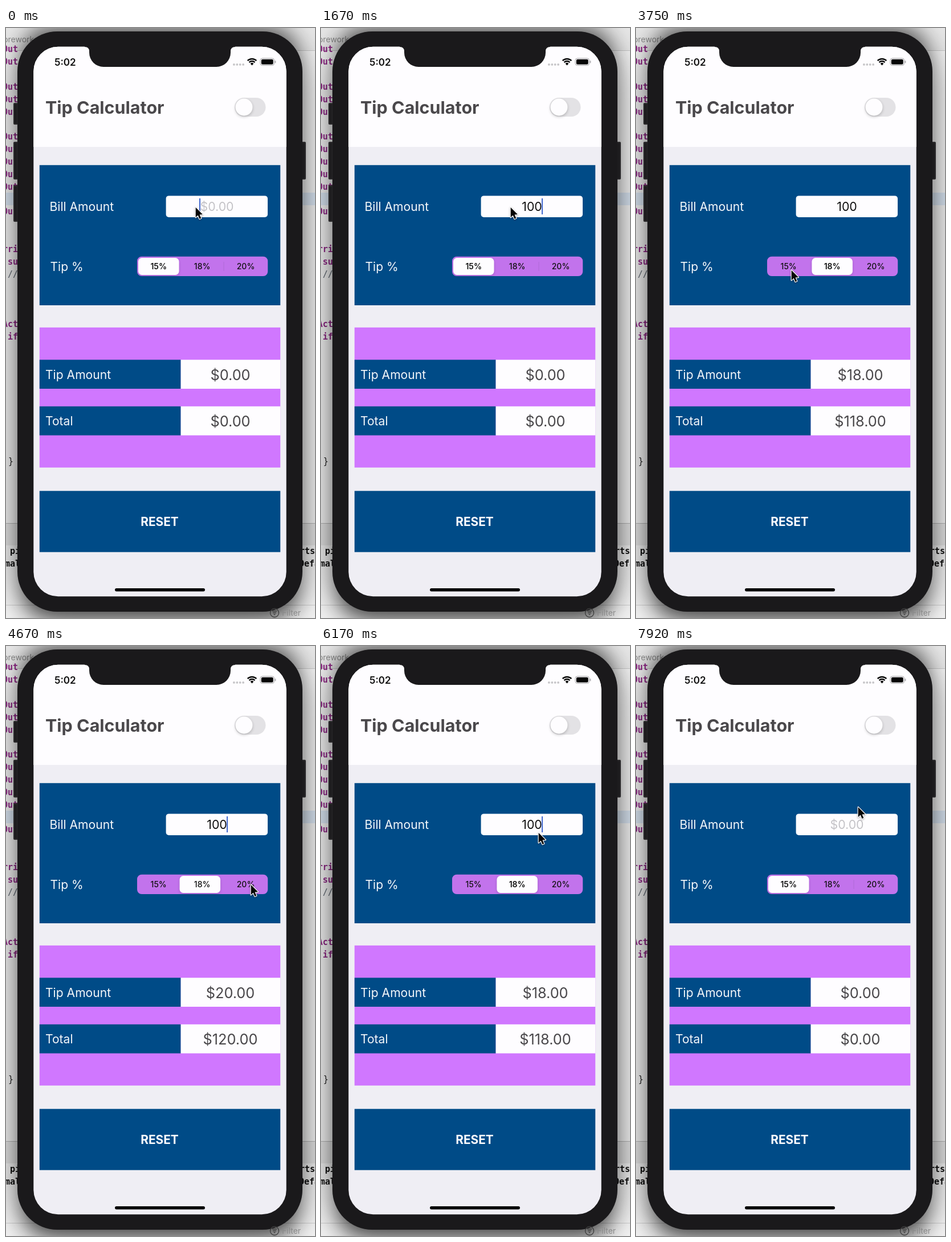
Animation, 542 px wide and 1032 px high, one loop 8000 ms. Source, as an HTML page with a canvas:

```html
<!DOCTYPE html>
<html lang="en">
<head>
<meta charset="utf-8">
<title>Tip Calculator</title>
<style>
html, body { margin: 0; width: 100%; height: 100%; overflow: hidden; background: #ccc; }
canvas { display: block; width: 542px; height: 1032px; }
</style>
</head>
<body>
<canvas id="stage" width="542" height="1032"></canvas>
<script>
const ctx = document.getElementById('stage').getContext('2d');
const LOOP = 8000, STEP = 1000 / 12;
const BLUE = '#004b87', PURPLE = '#d077ff', INK = '#4a484b', CASE = '#1a191b';
const SANS = 'Inter, "Liberation Sans", sans-serif';
const MONO = '"DejaVu Sans Mono", "Liberation Mono", monospace';

// [time, x, y] of the pointer tip
const pointer = [
  [0, 332, 313], [1850, 332, 313], [2580, 347, 416], [3080, 347, 416],
  [3600, 272, 423], [4000, 272, 423], [4420, 429, 417], [4920, 429, 417],
  [5330, 352, 417], [5670, 352, 417], [6120, 381, 326], [6250, 381, 326],
  [6830, 276, 858], [7250, 276, 858], [7920, 389, 281]
];
// [time, segment, slide duration]
const picks = [[0, 0, 0], [3000, 1, 300], [3850, 0, 300], [4500, 2, 345], [5500, 1, 300], [7170, 0, 300]];
const typed = [[0, ''], [580, '1'], [830, '10'], [1000, '100'], [7170, '']];
const rates = [15, 18, 20];

const clamp = v => Math.max(0, Math.min(1, v));
const ease = v => { v = clamp(v); return v * v * (3 - 2 * v); };
const mix = (a, b, k) => a + (b - a) * k;
const latest = (list, t) => list.filter(e => e[0] <= t).pop();

function rect(x, y, w, h, color) {
  ctx.fillStyle = color;
  ctx.fillRect(x, y, w, h);
}

function round(x, y, w, h, r, color) {
  ctx.fillStyle = color;
  ctx.beginPath();
  ctx.roundRect(x, y, w, h, r);
  ctx.fill();
}

function shadow(color, blur, dy, dx = 0) {
  ctx.shadowColor = color;
  ctx.shadowBlur = blur;
  ctx.shadowOffsetX = dx;
  ctx.shadowOffsetY = dy;
}

const noShadow = () => shadow('transparent', 0, 0);

// cy is the middle of the capital letters
function text(str, x, cy, size, color, weight = 400, align = 'left', family = SANS) {
  ctx.font = `${weight} ${size}px ${family}`;
  ctx.textAlign = align;
  ctx.fillStyle = color;
  ctx.fillText(str, x, cy + size * 0.364);
  return ctx.measureText(str).width;
}

function code(str, x, y, color, weight = 700) {
  text(str, x, y, 15, color, weight, 'left', MONO);
}

function drawEditor() {
  rect(0, 0, 542, 1032, '#f6f6f6');
  rect(0, 0, 542, 40, '#e9e9e9');
  rect(0, 39, 542, 1, '#c9c9c9');
  rect(0, 288, 542, 22, '#dce8f5');
  text('prework', -5, 20, 14, '#8b8b8b');
  [37, 59, 103, 125, 147, 190, 212, 234, 256, 278, 321].forEach(y => code('Out', -6, y, '#8f2686'));
  code('rri', -6, 387, '#8f2686');
  code(' su', -6, 409, '#8f2686');
  code(' //', -6, 431, '#5d6670', 400);
  code('Act', -6, 518, '#8f2686');
  code(' if', -6, 540, '#8f2686');
  code(' }', -5, 758, '#222', 400);
  rect(0, 867, 542, 38, '#e6e6e6');
  rect(0, 866, 542, 1, '#b5b5b5');
  code(' pi', -2, 915, '#111');
  code('mal', -2, 937, '#111');
  code('rts', 515, 915, '#111');
  code('Defa', 514, 937, '#111');
  rect(0, 1009, 542, 1, '#d0d0d0');
}

function drawFilter() {
  ctx.strokeStyle = '#3d3d3d';
  ctx.lineWidth = 1.3;
  ctx.beginPath();
  ctx.arc(471, 1023, 7.5, 0, 7);
  [4, 2.8, 1.4].forEach((w, i) => {
    ctx.moveTo(471 - w, 1020 + i * 3);
    ctx.lineTo(471 + w, 1020 + i * 3);
  });
  ctx.stroke();
  text('Filter', 484, 1023, 14, '#8a8a8a');
}

function drawPhone() {
  // only the shadows of these two shapes fall on the stage
  shadow('rgba(0,0,0,.56)', 60, 10, 2000);
  round(-1980, 6, 500, 1015, 70, '#000');
  shadow('rgba(0,0,0,.5)', 34, 0, 2000);
  round(-1966, 0, 472, 1030, 40, '#000');
  noShadow();
  [[13, 131, 38], [13, 199, 66], [13, 275, 64], [518, 199, 66]].forEach(([x, y, h]) => {
    round(x, y, 8, h, 2, '#2b2a2c');
    rect(x + 2, y + 2, 4, h - 4, '#1d1c1e');
  });
  round(20, 6, 500, 1015, 70, CASE);
  drawFilter();
  round(48.3, 32.8, 443.4, 961.5, 43, '#efeef4');
  round(48.3, 32.8, 443.4, 175.2, [43, 43, 0, 0], '#fefdff');
  // notch
  ctx.fillStyle = CASE;
  ctx.beginPath();
  ctx.moveTo(138, 32);
  ctx.lineTo(138, 33);
  ctx.quadraticCurveTo(146, 33, 146, 41);
  ctx.arcTo(146, 68, 172, 68, 25);
  ctx.arcTo(394, 68, 394, 42, 25);
  ctx.lineTo(394, 41);
  ctx.quadraticCurveTo(394, 33, 402, 33);
  ctx.lineTo(402, 32);
  ctx.fill();
  round(191, 980, 158, 5.5, 2.75, '#050505');
}

function drawStatus() {
  text('5:02', 85, 59.5, 17, '#111', 600);
  for (let i = 0; i < 4; i++) round(398 + i * 5.4, 62, 3.8, 3.8, 1.9, '#c6c5c8');
  ctx.strokeStyle = ctx.fillStyle = '#050505';
  ctx.lineWidth = 2.4;
  [11, 7].forEach(r => {
    ctx.beginPath();
    ctx.arc(431.5, 65, r, -Math.PI * 0.75, -Math.PI * 0.25);
    ctx.stroke();
  });
  ctx.beginPath();
  ctx.moveTo(431.5, 65.5);
  ctx.arc(431.5, 65, 4, -Math.PI * 0.75, -Math.PI * 0.25);
  ctx.fill();
  ctx.strokeStyle = '#a5a4a7';
  ctx.lineWidth = 1;
  ctx.beginPath();
  ctx.roundRect(446, 53, 24.5, 12.5, 3.8);
  ctx.stroke();
  round(447.8, 54.8, 20.9, 8.9, 2.2, '#050505');
  round(471.7, 57, 1.6, 4.5, 1, '#a5a4a7');
}

function drawField(value, caretOn) {
  round(280.6, 293.4, 178.4, 37.5, 5, '#fefdff');
  const size = 21.3;
  const w = value
    ? text(value, 370, 312.5, size, '#111', 400, 'center')
    : text('$0.00', 370, 312.5, size, '#c4c3c7', 400, 'center');
  if (caretOn) rect(Math.round(370 + (value ? w : -w) / 2) - 1, 298, 2, 28 - (value ? 0 : 4), '#4167ce');
}

function drawSegments(t) {
  const i = picks.indexOf(latest(picks, t));
  const [start, now, span] = picks[i];
  const before = i ? picks[i - 1][1] : 0;
  const k = span ? ease((t - start) / span) : 1;
  const pos = mix(before, now, k);
  round(230, 399.7, 229.2, 34.3, 8, '#c273ec');
  [306, 382].forEach((x, n) => {
    if (Math.abs(pos - n - 0.5) > 0.9) rect(x - 0.5, 409, 1, 16, '#b06ad8');
  });
  shadow('rgba(0,0,0,.14)', 5, 2);
  round(232 + pos * 76.4, 402, 71.5, 30, 6.5, '#fefdff');
  noShadow();
  rates.forEach((r, n) => {
    const weight = k === 1 && n === now ? 600 : 500;
    text(r + '%', 267.7 + n * 76.4, 417, 14, '#111', weight, 'center');
  });
  return rates[now];
}

function drawRow(label, y, amount) {
  rect(58.8, y, 247.8, 50.7, BLUE);
  rect(306.6, y, 174.6, 50.7, '#fefdff');
  text(label, 69, y + 26, 21.1, '#f4f7fa');
  text('$' + amount.toFixed(2), 393.5, y + 26, 25.3, INK, 400, 'center');
}

function drawApp(t) {
  text('Tip Calculator', 69, 139, 30.5, INK, 700);
  round(401, 122, 54.5, 33, 16.5, '#e3e2e5');
  shadow('rgba(0,0,0,.22)', 5, 2);
  round(402.5, 123.5, 30, 30, 15, '#fefdff');
  noShadow();

  rect(58.8, 239.8, 422.4, 245.2, BLUE);
  text('Bill Amount', 76.5, 312.5, 21.1, '#f4f7fa');
  text('Tip %', 77.5, 417, 21.1, '#f4f7fa');
  const value = latest(typed, t)[1];
  const blink = (t % 1000) / 1000;
  drawField(value, t < 1400 || (blink >= 0.15 && blink < 0.7));
  const rate = drawSegments(t);

  // results follow a choice of rate, not the typing
  const bill = t >= 3000 && t < 7170 ? 100 : 0;
  const tip = bill * rate / 100;
  rect(58.8, 523.8, 422.4, 245, PURPLE);
  drawRow('Tip Amount', 580.3, tip);
  drawRow('Total', 661.8, bill + tip);

  rect(58.8, 809.7, 422.4, 107, BLUE);
  text('RESET', 269.5, 863.5, 20.8, '#fefdff', 700, 'center');
}

function drawPointer(t) {
  let n = 0;
  while (n < pointer.length - 2 && pointer[n + 1][0] <= t) n++;
  const [t0, x0, y0] = pointer[n], [t1, x1, y1] = pointer[n + 1];
  const k = ease((t - t0) / (t1 - t0));
  ctx.save();
  ctx.translate(mix(x0, x1, k) + 0.7, mix(y0, y1, k) + 0.7);
  ctx.beginPath();
  [[0, 0], [0, 17.5], [4, 13.8], [6.8, 20.3], [9.6, 19], [6.8, 12.8], [12.2, 12.4]]
    .forEach(p => ctx.lineTo(...p));
  ctx.closePath();
  ctx.lineJoin = 'round';
  ctx.lineWidth = 2.4;
  ctx.strokeStyle = '#fff';
  shadow('rgba(0,0,0,.35)', 3, 1);
  ctx.stroke();
  noShadow();
  ctx.fillStyle = '#050505';
  ctx.fill();
  ctx.restore();
}

function draw(t) {
  drawEditor();
  drawPhone();
  drawStatus();
  drawApp(t);
  drawPointer(t);
}

const begin = performance.now();
function tick() {
  const t = (performance.now() - begin) % LOOP;
  draw(Math.floor((t + 4) / STEP) % 96 * STEP);
  requestAnimationFrame(tick);
}
tick();
</script>
</body>
</html>
```
